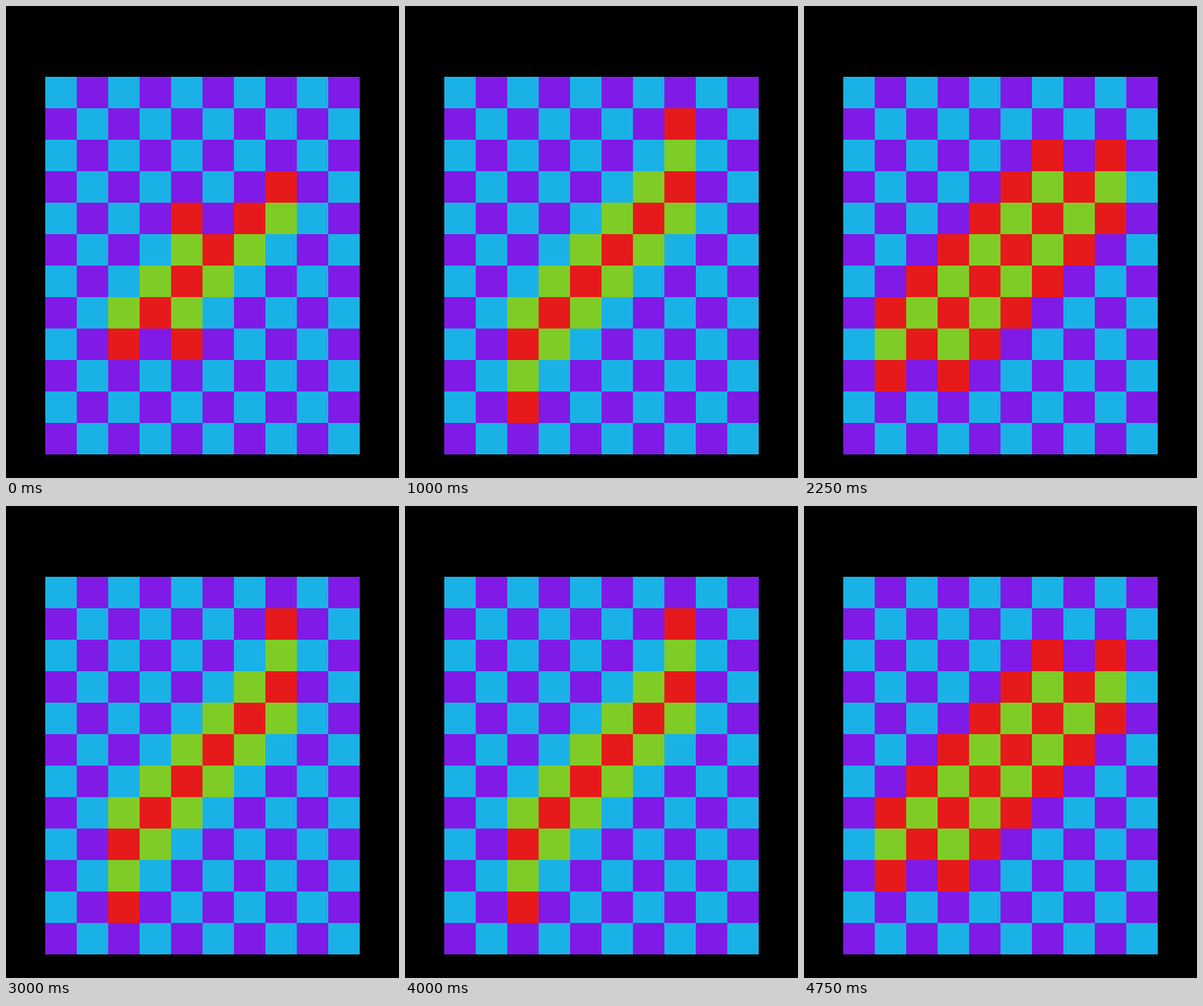
Animation, 500 px wide and 600 px high, one loop 5000 ms. Source, as an HTML page with a canvas:

```html
<!DOCTYPE html>
<html lang="en">
<head>
<meta charset="utf-8">
<title>Checkerboard cells</title>
<style>
  html, body { margin: 0; width: 100%; height: 100%; overflow: hidden; background: #000; }
  canvas { display: block; }
</style>
</head>
<body>
<canvas id="stage" width="500" height="600"></canvas>
<script>
const ctx = document.getElementById('stage').getContext('2d');
const COLS = 10, ROWS = 12, SIZE = 40, LEFT = 50, TOP = 90;
const STEP = 250, STEPS = 20;
const RESTING = ['#1ab2e6', '#801ae6'];
const ALIVE = ['#e61a1a', '#80cc26'];

// Each shape is a band around the board's rising diagonal.
// x, y: distance from the board's centre; side: signed offset from the diagonal.
const shapes = {
  // A half-grown band crossed by a short upright bar.
  seed: ({ row, col, x, side }) =>
    (x < 3 && Math.abs(side) <= 1 && (col - 4) * side >= 0) ||
    (col === 4 && Math.abs(row - 6) <= 2),

  // A thick band with a notch at either end.
  wide: ({ x, y, side }) =>
    x < 4 && y < 4 && Math.abs(side) <= 2 && !(x === 2.5 && y === 3.5),

  // A thin band with a tip at either end.
  tall: ({ x, y, side }) =>
    x < 3 && Math.abs(side) <= (y === 4.5 ? 2 : 1)
};

function draw(step) {
  const isAlive = shapes[step === 0 ? 'seed' : step % 2 ? 'wide' : 'tall'];
  for (let row = 0; row < ROWS; row++) {
    for (let col = 0; col < COLS; col++) {
      const cell = {
        row, col,
        x: Math.abs(col - (COLS - 1) / 2),
        y: Math.abs(row - (ROWS - 1) / 2),
        side: row + col - (ROWS + COLS - 2) / 2
      };
      const colors = isAlive(cell) ? ALIVE : RESTING;
      ctx.fillStyle = colors[(row + col) % 2];
      ctx.fillRect(LEFT + col * SIZE, TOP + row * SIZE, SIZE, SIZE);
    }
  }
}

const start = performance.now();
function frame() {
  draw(Math.floor((performance.now() - start) / STEP) % STEPS);
  requestAnimationFrame(frame);
}
frame();
</script>
</body>
</html>
```
